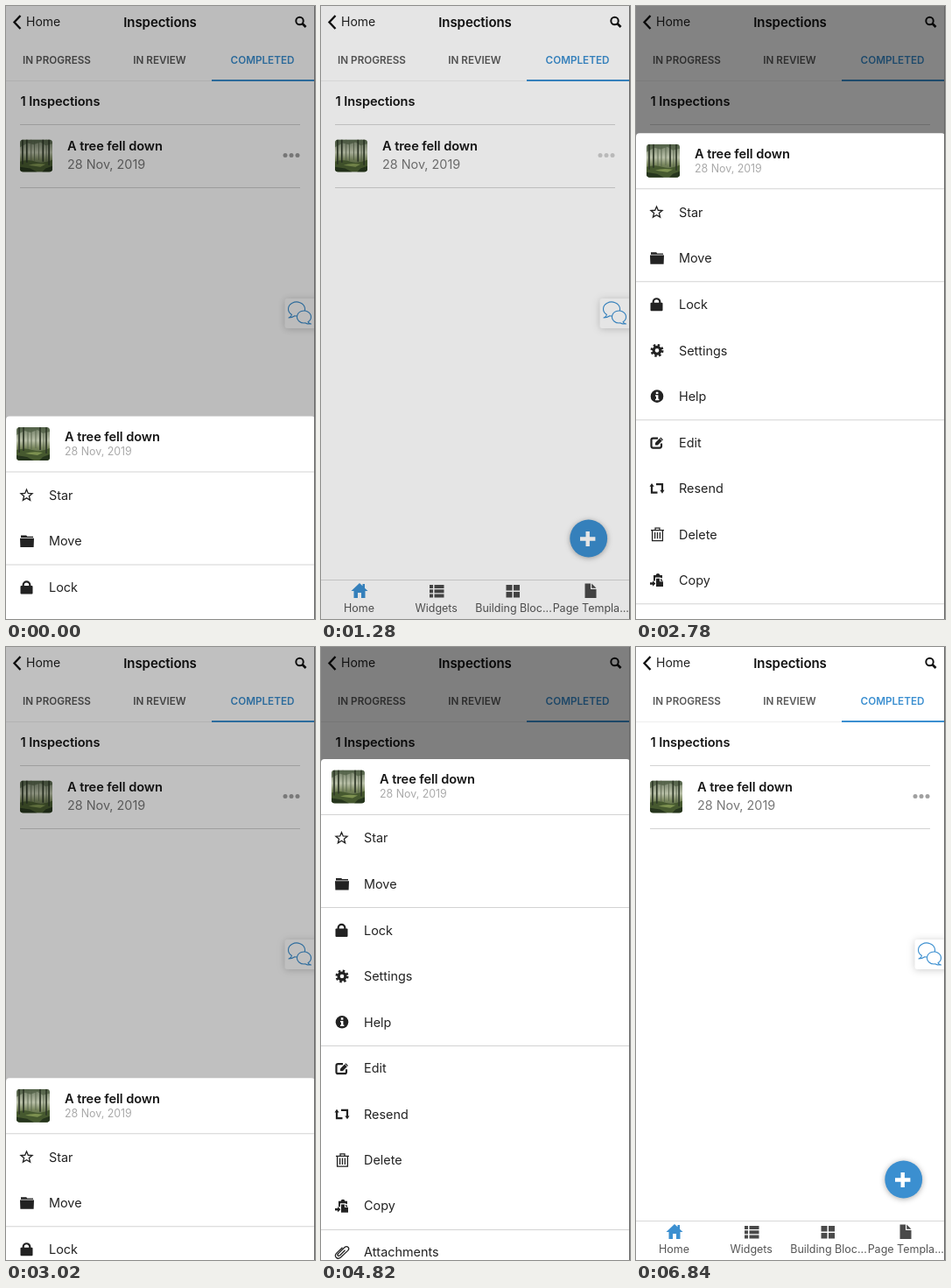
An HTML page that plays this animation: 353 by 700 pixels, repeating every 6880 ms.

```html
<!DOCTYPE html>
<html lang="en">
<head>
<meta charset="utf-8">
<title>Inspections</title>
<style>
  @property --closed { syntax: "<number>"; inherits: true; initial-value: 1; }
  html, body { margin: 0; width: 100%; height: 100%; overflow: hidden; background: #fff; }
  svg.stage {
    display: block; width: 353px; height: 700px;
    font-family: Inter, Roboto, sans-serif; font-size: 14.4px; fill: #222;
    animation: sheet 6880ms linear infinite;
  }
  text { white-space: pre; }
  .title { font-size: 14.6px; font-weight: 600; letter-spacing: -.08px; fill: #161616; }
  .heading { font-size: 15px; font-weight: 600; letter-spacing: -.08px; fill: #111; }
  .tabs { font-size: 11.7px; font-weight: 600; fill: #5a5a5a; text-anchor: middle; }
  .nav { font-size: 12.5px; fill: #555; text-anchor: middle; }
  .blue { fill: #3b8fd0; }
  .rule { fill: #d3d3d3; }
  .line { fill: none; stroke: #222; stroke-width: 1.3; }
  .bold { stroke-width: 2.2; }
  .shadow { filter: drop-shadow(0 1px 3px #0005); }
  .soft { filter: drop-shadow(0 1px 4px #0003); }

  /* One number drives both the sheet and the backdrop. */
  .sheet { transform: translateY(calc(128px + var(--closed) * 723px)); }
  .backdrop { opacity: calc(.5 - .5 * var(--closed)); }
  .dots { fill: #a0a0a0; animation: press 6880ms step-end infinite; }

  @keyframes sheet {
    0% { --closed: .469; }
    3.859%, 17.122% { --closed: 1; }
    24.39%, 40.247% { --closed: 0; }
    47.515%, 59.041% { --closed: 1; }
    66.308%, 90.262% { --closed: 0; }
    97.529%, 100% { --closed: 1; }
  }
  @keyframes press {
    0%, 24.39%, 66.308% { fill: #a0a0a0; }
    15.116%, 56.686% { fill: #cecece; }
  }
</style>
</head>
<body>
<svg class="stage" viewBox="0 0 353 700">
  <defs>
    <linearGradient id="forest" x2="0" y2="1">
      <stop offset="0" stop-color="#6d7a62"/>
      <stop offset=".4" stop-color="#b9c0a8"/>
      <stop offset=".62" stop-color="#78865c"/>
      <stop offset="1" stop-color="#33442a"/>
    </linearGradient>
    <clipPath id="round"><rect width="38" height="38" rx="4"/></clipPath>
    <symbol id="photo" viewBox="0 0 38 38">
      <g clip-path="url(#round)">
        <rect width="38" height="38" fill="url(#forest)"/>
        <path d="M0 0H38V5L30 7 24 3 16 6 9 4 0 9Z" fill="#44543a" opacity=".6"/>
        <path d="M0 26Q10 23 18 26T38 24V38H0Z" fill="#46592f"/>
        <path d="M10 30Q18 27 30 29L24 32Z" fill="#7d9150"/>
        <path d="M3 0V29M8 0V27M27 0V26M34 0V30" stroke="#2d3726" stroke-width="1.7"/>
        <path d="M13 0V25M17 2V25M22 3V24M31 0V26" stroke="#56624a" stroke-width=".9"/>
        <path d="M0 32 12 34 20 38H0ZM38 31 30 34 26 38H38Z" fill="#26351d"/>
      </g>
    </symbol>
  </defs>

  <rect width="353" height="700" fill="#fff"/>

  <path d="M16.5 11 9.5 18.5 16.5 26" fill="none" stroke="#111" stroke-width="2.4"/>
  <text x="23" y="23.3" font-size="14">Home</text>
  <text class="heading" x="176" y="23.5" text-anchor="middle">Inspections</text>
  <g fill="none" stroke="#111" stroke-width="2">
    <circle cx="335.5" cy="17" r="4.2"/>
    <path d="M338.5 20 342.5 24" stroke-width="2.6"/>
  </g>

  <g class="tabs">
    <text x="58" y="65.6">IN PROGRESS</text>
    <text x="175.5" y="65.6">IN REVIEW</text>
    <text x="293" y="65.6" class="blue">COMPLETED</text>
  </g>
  <rect y="85" width="353" height="1" fill="#eee"/>
  <rect class="blue" x="235" y="84" width="118" height="2"/>

  <text class="title" x="16.5" y="114.4">1 Inspections</text>
  <rect class="rule" x="16" y="135" width="320" height="1"/>
  <use href="#photo" x="16" y="152.5" width="37" height="37"/>
  <text class="title" x="70" y="164.5">A tree fell down</text>
  <text x="70" y="186" fill="#777">28 Nov, 2019</text>
  <g class="dots">
    <circle cx="319" cy="170.5" r="2.5"/>
    <circle cx="326" cy="170.5" r="2.5"/>
    <circle cx="333" cy="170.5" r="2.5"/>
  </g>
  <rect class="rule" x="16" y="207" width="320" height="1"/>

  <rect class="soft" x="318.5" y="334" width="40" height="34" rx="3" fill="#fff"/>
  <g fill="#fff" stroke="#3b8fd0" stroke-width="1.1" stroke-linejoin="round">
    <path d="M326.5 352.5A9.5 8 0 1 1 330 353.8Q327 356 323 356Q326 354.8 326.5 352.5Z"/>
    <path d="M345 360.8A8 7 0 1 0 342 361.9Q344.5 363.3 348.5 363Q345.8 362.3 345 360.8Z"/>
  </g>

  <circle class="blue shadow" cx="305.7" cy="608" r="21.4"/>
  <path d="M296 608.5H313.4M304.7 600V617" stroke="#fff" stroke-width="4.4"/>

  <rect y="655" width="353" height="1" fill="#d8d8d8"/>
  <g fill="#4a4a4a">
    <path class="blue" d="M34.5 668 44 659 47.5 662.3V660H50V664.7L53.5 668H50.5V676H46V670H42V676H37.5V668Z"/>
    <path d="M124 661h4v4h-4zm5.5 0h11v4h-11zM124 666.2h4v4h-4zm5.5 0h11v4h-11zM124 671.4h4v4h-4zm5.5 0h11v4h-11z"/>
    <path d="M211.5 661h7v6.6h-7zm8.5 0h7v6.6h-7zM211.5 669h7v6.6h-7zm8.5 0h7v6.6h-7z"/>
    <path d="M301.5 659.5H308V666H314.5V676H301.5ZM309.2 659.5 314.5 664.8H309.2Z"/>
  </g>
  <g class="nav">
    <text x="43.5" y="692.4">Home</text>
    <text x="131.7" y="692.4">Widgets</text>
    <text x="220" y="692.4">Building Bloc...</text>
    <text x="308.3" y="692.4">Page Templa...</text>
  </g>

  <rect class="backdrop" width="353" height="700" fill="#000"/>

  <g class="sheet">
    <path d="M0 740V4Q0 0 4 0H349Q353 0 353 4V740Z" fill="#fff"/>
    <use href="#photo" x="12" y="12.5" width="38" height="38"/>
    <text class="title" x="67" y="28.3">A tree fell down</text>
    <text x="67" y="44.2" font-size="12.4" fill="#aaa">28 Nov, 2019</text>
    <path class="rule" d="M0 63H353v1H0zM0 169H353v1H0zM0 327H353v1H0zM0 537H353v1H0z"/>

    <!-- Each row is centred on its own origin, icons around x = 24. -->
    <g transform="translate(0 90)">
      <path class="line" d="M23.5-6.3 25.3-2.1 30-1.8 26.4 1.2 27.6 5.8 23.5 3.3 19.4 5.8 20.6 1.2 17-1.8 21.7-2.1Z"/>
      <text x="49" y="5.2">Star</text>
    </g>
    <g transform="translate(0 142.5)">
      <path d="M17-6.5H23.2L24.2-5.4H31V-4H17ZM16-3.3H32L31.6 7H16.4Z"/>
      <text x="49" y="5.2">Move</text>
    </g>
    <g transform="translate(0 195.5)">
      <rect x="16.5" y="-2" width="14" height="9.5" rx="1"/>
      <path class="line bold" d="M19.7-1V-3A3.8 3.6 0 0 1 27.3-3V-1"/>
      <text x="49" y="5.2">Lock</text>
    </g>
    <g transform="translate(0 248)">
      <g fill="none" stroke="#222">
        <circle cx="24" r="3.9" stroke-width="3.2"/>
        <circle cx="24" r="6.2" stroke-width="2.6" stroke-dasharray="2.435"/>
      </g>
      <text x="49" y="5.2">Settings</text>
    </g>
    <g transform="translate(0 300.3)">
      <circle cx="24" r="7.3"/>
      <path d="M22.8-5h2.6v2.4h-2.6zM22-1.4h3.4V3.2h1V4.7H22V3.2h1V.1h-1z" fill="#fff"/>
      <text x="49" y="5.2">Help</text>
    </g>
    <g transform="translate(0 353.2)">
      <path class="line bold" d="M25-5H19.5Q17.5-5 17.5-3V4Q17.5 6 19.5 6H27Q29 6 29 4V1"/>
      <path d="M22 3V.2L28.2-6 31-3.2 24.8 3Z"/>
      <path d="M26.6-5.4 30.2-1.8" stroke="#fff" stroke-width=".8"/>
      <text x="49" y="5.2">Edit</text>
    </g>
    <g transform="translate(0 405.5)">
      <path class="line bold" d="M18-3V4.7H24.5M23-4.7H30V3"/>
      <path d="M15.5-2 18-5.8 20.7-2ZM27.3 2 30 5.8 32.5 2Z"/>
      <text x="49" y="5.2">Resend</text>
    </g>
    <g transform="translate(0 458)">
      <path class="line" d="M17-4.7H32M22-5V-7.2H27V-5M18.6-4.5V7.2H30.4V-4.5M21.6-2.4V5M24.5-2.4V5M27.4-2.4V5"/>
      <text x="49" y="5.2">Delete</text>
    </g>
    <g transform="translate(0 510.2)">
      <path d="M20-5.5H22.5Q23-7.5 25-7.5T27.5-5.5H30V-2L27.5-3H22V1H20ZM23-1.8H27V1.8H31V7.5H23ZM28-1.8 31 1H28Z"/>
      <path d="M16 2.8H19V.8L22.4 4 19 7.2V5.2H16Z"/>
      <text x="49" y="5.2">Copy</text>
    </g>
    <g transform="translate(0 563)">
      <path class="line" d="M27.5-2.2 21.6 3.8Q20 5 19.2 3.8T19.8 1.6L27-5.4Q29.3-7.3 31-5.5T30.6-1.6L22.5 6Q19.5 8.4 17.4 6.2T17.6 1.4L24.5-5.2"/>
      <text x="49" y="5.2">Attachments</text>
    </g>
  </g>

  <rect x="352" width="1" height="700" fill="#666"/>
</svg>
</body>
</html>
```
